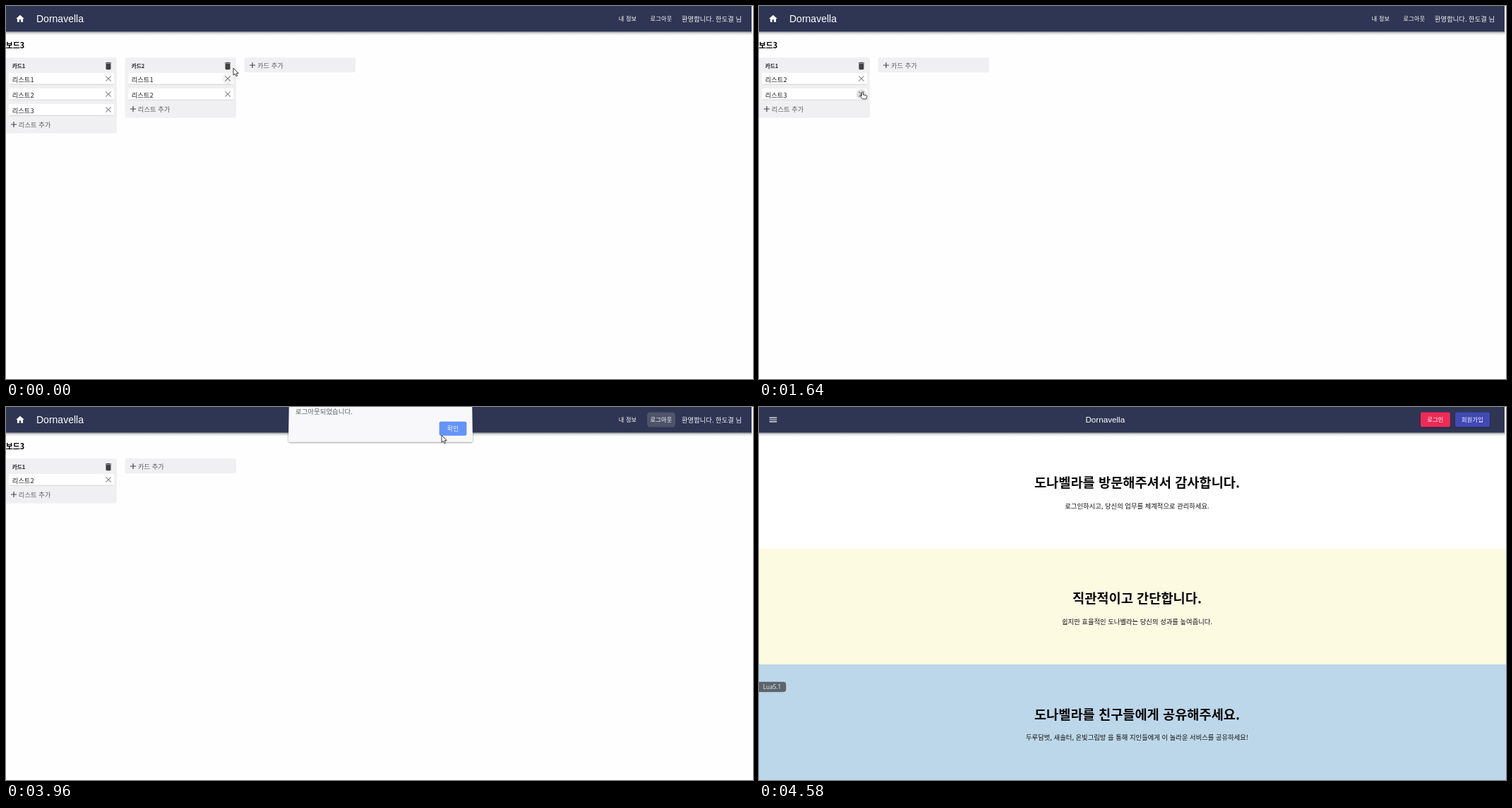
Animation of 1058 by 529 pixels, one loop 4840 ms. Source, as an HTML page:

```html
<!DOCTYPE html>
<html lang="ko">
<head>
<meta charset="utf-8">
<title>Board</title>
<style>
html, body { margin: 0; width: 100%; height: 100%; overflow: hidden; background: #fefefe; }
svg { display: block; width: 100vw; height: 100vh; }
text { font-family: "Noto Sans CJK KR", "Noto Sans CJK", "Noto Sans", sans-serif; white-space: pre; }
text.brand { font-family: "Liberation Sans", Arial, sans-serif; }
text.tip { font-family: "Noto Sans", sans-serif; }
</style>
</head>
<body>
<svg id="stage" viewBox="0 0 1058 529" xmlns="http://www.w3.org/2000/svg"></svg>
<script>
const LOOP = 4840;
const REM = 9.33;
const ICON = {
  home: "M10 20v-6h4v6h5v-8h3L12 3 2 12h3v8z",
  menu: "M3 18h18v-2H3v2zm0-5h18v-2H3v2zm0-7v2h18V6H3z",
  trash: "M6 19c0 1.1.9 2 2 2h8c1.1 0 2-.9 2-2V7H6v12zM19 4h-3.5l-1-1h-5l-1 1H5v2h14V4z",
  close: "M19 6.41L17.59 5 12 10.59 6.41 5 5 6.41 10.59 12 5 17.59 6.41 19 12 13.41 17.59 19 19 17.59 13.41 12z",
  add: "M19 13h-6v6h-2v-6H5v-2h6V5h2v6h6v2z"
};

// Markup helpers; cy is the optical middle of a line of text
const rect = (x, y, w, h, fill, rx = 0, extra = "") =>
  `<rect x="${x}" y="${y}" width="${w}" height="${h}" rx="${rx}" fill="${fill}" ${extra}/>`;
const label = (s, x, cy, size, fill, weight = 400, extra = "") =>
  `<text x="${x}" y="${cy + size * 0.38}" font-size="${size}" fill="${fill}" font-weight="${weight}" ${extra}>${s}</text>`;
const middle = (s, x, cy, size, fill, weight, extra = "") =>
  label(s, x, cy, size, fill, weight, `text-anchor="middle" ${extra}`);
const icon = (name, cx, cy, fill) =>
  `<path d="${ICON[name]}" fill="${fill}" transform="translate(${cx - 7} ${cy - 7}) scale(.583)"/>`;
const brand = (x, y, size, anchor) =>
  `<text class="brand" x="${x}" y="${y}" font-size="${size}" fill="#fff" text-anchor="${anchor}">Dornavella</text>`;
const button = (s, cx, cy = 18) =>
  middle(s, cx, cy, 8.17, "#fff", 500, 'letter-spacing=".2"');
const header = () =>
  rect(0, 36.5, 1056.5, 5, "url(#shade)") + rect(0, 0, 1056, 36.5, "#2f3654");

const rowY = i => 95 + 22 * i;

function card(x, title, items) {
  const end = rowY(items.length);
  const rows = items.map((s, i) => {
    const y = rowY(i);
    return rect(x + 4.5, y + 15, 148, 1.6, "#cbcbcb", 1) +
      rect(x + 4, y, 149, 15.7, "#fff", 1.5) +
      label(s, x + 8.7, y + 9, REM, "#222", 500) +
      icon("close", x + 145, y + 8, "#8a8a8a");
  }).join("");
  return rect(x - (x ? 0.5 : 3), 73, x ? 157.5 : 160, end + 20 - 73 - 0.5, "#f0f0f2", 3) +
    label(title, x + 8.7, 85, 7.7, "#222", 700) +
    icon("trash", x + 145, 85, "#404040") + rows +
    icon("add", x + 11, end + 7, "#444") +
    label("리스트 추가", x + 17.8, end + 7, REM, "#606060");
}

function addCard(x) {
  return rect(x - 0.5, 73, 157.5, 21.3, "#f0f0f2", 3) +
    icon("add", x + 11, 84, "#444") +
    label("카드 추가", x + 18, 84, REM, "#606060");
}

function board(items, second) {
  return card(0, "카드1", items) +
    (second ? card(169, "카드2", ["리스트1", "리스트2"]) + addCard(338) : addCard(169));
}

function section(y, h, fill, title, text, cy) {
  return rect(0, y, 1058, h, fill) +
    middle(title, 535.5, cy, 18.67, "#0a0a0a", 700) +
    middle(text, 535.5, cy + 32.7, REM, "#111", 400);
}

const stage = document.getElementById("stage");
stage.innerHTML = `
<defs>
  <linearGradient id="shade" x2="0" y2="1">
    <stop offset="0" stop-opacity=".42"/><stop offset=".4" stop-opacity=".15"/><stop offset="1" stop-opacity="0"/>
  </linearGradient>
  <filter id="soft" x="-10%" y="-20%" width="120%" height="150%">
    <feDropShadow dx="0" dy="1" stdDeviation="1" flood-opacity=".45"/>
  </filter>
  <clipPath id="logoutBox">${rect(908, 7.4, 40, 21.2, "#000", 2)}</clipPath>
</defs>
${rect(0, 0, 1058, 529, "#fefefe")}
<g id="app">
  ${header()}
  ${icon("home", 20, 18, "#fff")}
  ${brand(43, 23, 14, "start")}
  <g clip-path="url(#logoutBox)">
    <rect id="logoutHover" x="908" y="7" width="40" height="22" fill="#000"/>
    <circle id="logoutRipple" cx="928" cy="18" fill="#fff" fill-opacity=".17"/>
  </g>
  ${button("내 정보", 880.5)}
  ${button("로그아웃", 928)}
  ${label("환영합니다. 한도결 님", 957, 18.3, REM, "#f4f4f6")}
  ${label("보드3", -0.3, 56, 10.92, "#000", 700)}
  <g id="board"></g>
  <circle id="spot" fill="#000"/>
</g>
<g id="landing">
  ${section(0, 201, "#fff", "도나벨라를 방문해주셔서 감사합니다.", "로그인하시고, 당신의 업무를 체계적으로 관리하세요.", 107.3)}
  ${section(201, 164, "#fdfae2", "직관적이고 간단합니다.", "쉽지만 효율적인 도나벨라는 당신의 성과를 높여줍니다.", 271.4)}
  ${section(365, 164, "#bdd7ea", "도나벨라를 친구들에게 공유해주세요.", "두루담벗, 새솔터, 온빛그림방 을 통해 지인들에게 이 놀라운 서비스를 공유하세요!", 435.6)}
  ${header()}
  ${icon("menu", 20, 18, "#fff")}
  ${brand(490.3, 22, 11.67, "middle")}
  ${rect(937, 7.6, 42, 20.6, "#ee2956", 2, 'filter="url(#soft)"')}
  ${rect(986, 7.6, 49, 20.6, "#3f49b5", 2, 'filter="url(#soft)"')}
  ${button("로그인", 958)}
  ${button("회원가입", 1010.5)}
</g>
<g id="dialog">
  <path d="M401-9L400 47q0 2.5 2 2.5H659q2 0 2-2.5L660-9z" fill="#f8f8fa" filter="url(#soft)"/>
  ${label("로그아웃되었습니다.", 410, 6, 9.45, "#5a5f6b")}
  ${rect(614, 21, 38, 19.3, "#6493fa", 2, 'stroke="#5583ea" stroke-width=".6"')}
  ${middle("확인", 633, 30.5, 8.9, "#eef2fd", 500)}
</g>
<g id="tip">
  ${rect(-5, 389.7, 43.3, 14.6, "#5c656b", 4)}
  <text class="tip" x="5.8" y="400" font-size="8.2" fill="#e6e8ea">Lua5.1</text>
</g>
<path id="arrow" d="M0 0V10.2L2.4 8.1 4 11.6 5.7 10.8 4.2 7.4H7.2z" fill="#fff" stroke="#2a2a2a" stroke-width=".9" stroke-linejoin="round"/>
<path id="hand" d="M-1.1 1a1.1 1.1 0 0 1 2.2 0V4l4 .6q1.6.3 1.4 1.7L5.7 9.8H.2L-3 6.3q-.5-1.2 1-1.1l.9.6z" fill="#fff" stroke="#2a2a2a" stroke-width=".9" stroke-linejoin="round"/>`;

const el = {};
stage.querySelectorAll("[id]").forEach(n => el[n.id] = n);
const set = (n, o) => { for (const k in o) n.setAttribute(k, o[k]); };
const show = (n, on) => set(n, { visibility: on ? "visible" : "hidden" });
const ramp = (t, a, b) => Math.min(1, Math.max(0, (t - a) / (b - a)));
const ease = p => p * p * (3 - 2 * p);

// Pointer legs: start, end, target x, target y
const START = [322, 88];
const LEGS = [
  [0, 280, 314, 84],
  [540, 720, 116, 114],
  [760, 1000, 146, 101],
  [1380, 1620, 146.5, 122],
  [2270, 2520, 929, 19],
  [3240, 3340, 919, 25.5],
  [3400, 3770, 617, 40],
  [4470, 4570, -12, 396]
];
// Times when the pointer is a hand
const HANDS = [[180, 560], [930, 1390], [1560, 2290], [2480, 3420]];
// Icon button feedback: press time, x, y
const PRESSES = [[500, 314, 85], [1100, 145, 103], [1700, 145, 125]];

function pointer(t) {
  let [x, y] = START;
  for (const [a, b, tx, ty] of LEGS) {
    const p = ease(ramp(t, a, b));
    x += (tx - x) * p;
    y += (ty - y) * p;
  }
  return [x, y];
}

function spot(t) {
  for (const [at, x, y] of PRESSES) {
    const p = ramp(t, at, at + 180);
    const fade = 1 - ramp(t, at + 200, at + 400);
    if (t >= at && fade > 0) return [x, y, 3 + 5 * p, 0.13 * fade];
  }
  if (t < 160) return [314, 103, 8, 0.045 * (1 - ramp(t, 40, 160))];
  if (t >= 940 && t < 1100) return [145, 103, 8, 0.05];
  if (t >= 1560 && t < 1700) return [145, 125, 7, 0.12];
  return [0, 0, 0, 0];
}

let shown = "";
function draw(t) {
  const landed = t >= 4020;
  show(el.app, !landed);
  show(el.landing, landed);

  const names = [t < 1220 && 1, 2, t < 1860 && 3].filter(Boolean).map(n => "리스트" + n);
  const key = names + (t < 580);
  if (key !== shown) {
    el.board.innerHTML = board(names, t < 580);
    shown = key;
  }

  const [sx, sy, r, alpha] = spot(t);
  set(el.spot, { cx: sx, cy: sy, r, "fill-opacity": alpha });
  set(el.logoutHover, { "fill-opacity": 0.1 * ramp(t, 2470, 2520) });
  set(el.logoutRipple, { r: 21 * ramp(t, 3240, 3340) });

  const open = ramp(t, 3280, 3381);
  set(el.dialog, {
    opacity: open * (1 - ramp(t, 4020, 4220)),
    transform: `translate(0 ${(1 - open) * 5})`
  });

  const [x, y] = pointer(t);
  const hand = HANDS.some(([a, b]) => t >= a && t < b);
  const at = { transform: `translate(${x} ${y})` };
  set(el.arrow, at);
  set(el.hand, at);
  show(el.arrow, !hand);
  show(el.hand, hand);
  show(el.tip, t >= 4560);
}

const began = performance.now();
function tick() {
  draw((performance.now() - began) % LOOP);
  requestAnimationFrame(tick);
}
draw(0);
requestAnimationFrame(tick);
</script>
</body>
</html>
```
